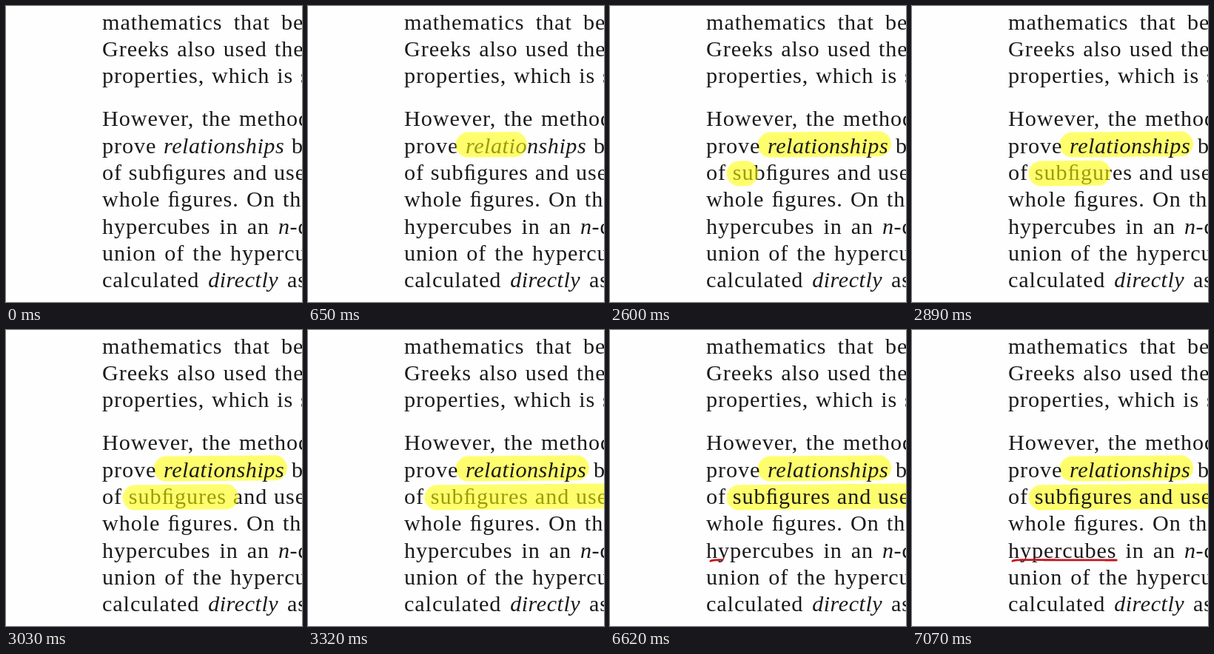
Write an HTML page with a canvas that moves like this. It is 400 by 400 pixels and loops after 8 s.

```html
<!DOCTYPE html>
<html lang="en">
<head>
<meta charset="utf-8">
<style>
html, body { margin: 0; width: 100%; height: 100%; overflow: hidden; background: #fefefe; }
canvas { display: block; }
</style>
</head>
<body>
<canvas id="page" width="400" height="400"></canvas>
<script>
const ctx = document.getElementById("page").getContext("2d");
const LOOP = 8000;
const LEFT = 130;
const FONT = '30.2px "Liberation Serif", serif';

// Text with *italics*, and where justification puts the last word.
const lines = [
  ["mathematics that be", 372],
  ["Greeks also used the", 363],
  ["properties, which is s", 398],
  ["However, the method", 315],
  ["prove *relationships* b", 386],
  ["of sub\ufb01gures and use", 362],
  ["whole \ufb01gures. On th", 374],
  ["hypercubes in an *n*-d", 368],
  ["union of the hypercu", 303],
  ["calculated *directly* as", 380]
];

// Each stroke grows in steps; reach gives its end after k steps.
const yellow = { color: "rgba(255, 255, 0, 0.57)", width: 34, slope: -0.009, hook: 0 };
const strokes = [
  { ...yellow, start: 500, step: 150, done: 1100, x: 216.5, y: 187.6,
    reach: k => Math.min(363, 236 + 43 * k) },
  { ...yellow, start: 2600, step: 145, done: 3620, x: 174.5, y: 226.4,
    reach: k => 183 + 29 * k ** 1.25 },
  { color: "#c4161f", width: 2.8, slope: 0.003, hook: 1.6,
    start: 6620, step: 150, done: LOOP, x: 135.8, y: 310.6,
    reach: k => Math.min(276.3, 152 + 53 * k) }
];

function setStyle(italic) {
  ctx.font = (italic ? "italic " : "") + FONT;
  ctx.letterSpacing = italic ? "0.5px" : "0.9px";
}

// Walks the pieces of a word, drawing them if a baseline is given.
function setWord(word, x, baseline) {
  const from = x;
  word.split("*").forEach((piece, i) => {
    setStyle(i % 2 === 1);
    if (baseline !== undefined) ctx.fillText(piece, x, baseline);
    x += ctx.measureText(piece).width;
  });
  return x - from;
}

function drawText() {
  ctx.fillStyle = "#1a1a1a";
  lines.forEach(([text, lastX], row) => {
    const words = text.split(" ");
    const baseline = 31.5 + 36.3 * row + (row > 2 ? 21.9 : 0);
    const inner = words.slice(0, -1);
    const filled = inner.reduce((sum, word) => sum + setWord(word, 0), 0);
    const gap = (lastX - LEFT - filled) / inner.length;
    let x = LEFT;
    for (const word of words) x += setWord(word, x, baseline) + gap;
  });
}

function drawStroke(s, time) {
  if (time < s.start) return;
  // Steps fall on whole hundredths of a second.
  const elapsed = Math.floor((time - s.start) / 10) * 10 + 5;
  const end = s.reach(Math.floor(elapsed / s.step));
  ctx.beginPath();
  for (let d = 0; s.x + d <= end; d += 0.5) {
    ctx.lineTo(s.x + d, s.y + s.slope * d + s.hook * Math.exp(-d / 4));
  }
  ctx.strokeStyle = s.color;
  ctx.lineWidth = s.width;
  ctx.lineCap = ctx.lineJoin = "round";
  ctx.stroke();
}

// Wet ink covers the text; finished ink lies beneath it.
function drawStrokes(time, finished) {
  for (const s of strokes) {
    if (time >= s.done === finished) drawStroke(s, time);
  }
}

function render(time) {
  ctx.fillStyle = "#fefefe";
  ctx.fillRect(0, 0, 400, 400);
  drawStrokes(time, true);
  drawText();
  drawStrokes(time, false);
}

const origin = performance.now();
function tick() {
  render((performance.now() - origin) % LOOP);
  requestAnimationFrame(tick);
}
tick();
</script>
</body>
</html>
```
